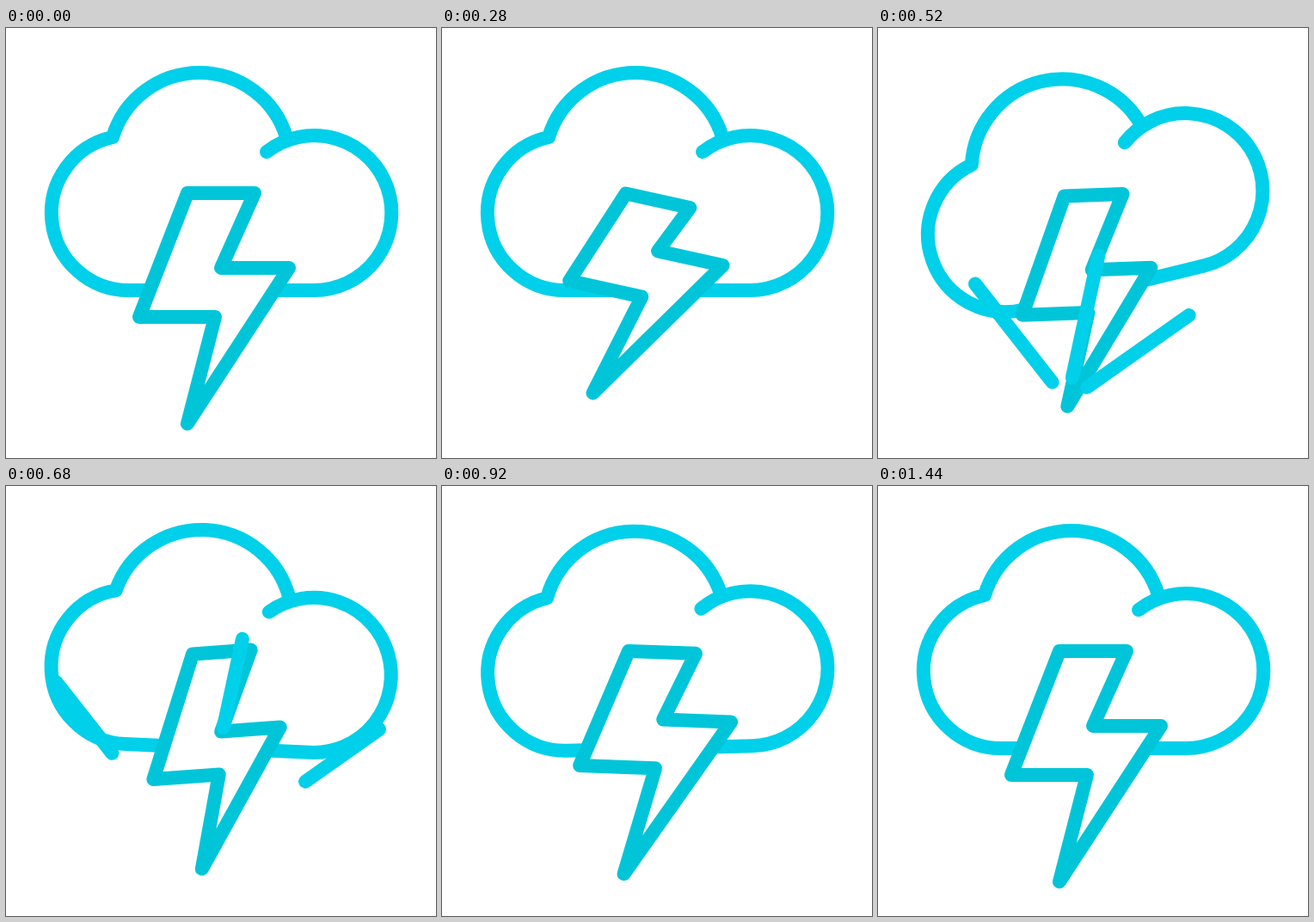
An HTML page with a canvas for the animation above (2000 ms loop, 500 by 500 pixels).

```html
<!DOCTYPE html>
<html lang="en">
<head>
<meta charset="utf-8">
<title>Thunderstorm</title>
<style>
  html, body { margin: 0; width: 100%; height: 100%; overflow: hidden; background: #fff; }
  canvas { display: block; width: 100vmin; height: 100vmin; }
</style>
</head>
<body>
<canvas id="stage" width="500" height="500"></canvas>
<script>
const ctx = document.getElementById('stage').getContext('2d');
const LOOP = 2000, STEP = 40;
const CLOUD = '#00d0e9', BOLT = '#00c5d9';

const cloudPath = new Path2D(
  'M326 127A105.5 105.5 0 0 0 124 127A90 90 0 0 0 143 305H358A90 90 0 1 0 303 144');

// Bolt corners relative to its top left one.
const boltTop = [[0, 0], [78, 0]];
const boltBody = [[39, 87], [118, 87], [0, 268], [32, 144], [-56, 144]];

const RAY_ANGLES = [-128.1, -77.9, -35.2];
const RAY_LENGTH = 262;

const radians = degrees => degrees * Math.PI / 180;
const clamp01 = v => Math.min(1, Math.max(0, v));
const smooth = u => u * u * (3 - 2 * u);
const ramp = (t, from, to) => smooth(clamp01((t - from) / (to - from)));

// Eases from zero through [time, value] turning points.
function swing(t, start, turns) {
  let value = 0, from = start;
  for (const [to, goal] of turns) {
    value += (goal - value) * ramp(t, from, to);
    if (t < to) break;
    from = to;
  }
  return value;
}

function drawCloud(t) {
  const tilt = swing(t, 280, [[480, -15.1], [720, 4], [960, -1.9], [1200, 1.2], [1440, 0]]);
  ctx.save();
  ctx.translate(250, 206);
  ctx.rotate(radians(tilt));
  ctx.translate(-250, -206);
  ctx.strokeStyle = CLOUD;
  ctx.stroke(cloudPath);
  ctx.restore();
}

// The top edge stays nearly in place while the body leans, slides and shrinks.
function drawBolt(t) {
  const lean = swing(t, 0, [[280, 12.4], [590, -4.2], [680, -4.2], [920, 2.1], [1120, 0]]);
  const slide = swing(t, 0, [[280, -28.5], [590, 19], [680, 19], [920, -9], [1120, 0]]);
  const shrink = ramp(t, 200, 520) - ramp(t, 680, 920);
  const drift = ramp(t, 0, 600) - ramp(t, 920, 1120);
  const body = boltBody.map(([x, y]) => [x - 0.45 * slide, y + slide]);

  ctx.save();
  ctx.translate(211 + 6 * drift, 192 + 3.5 * shrink);
  ctx.rotate(radians(lean));
  const scale = 1 - 0.13 * shrink;
  ctx.beginPath();
  for (const [x, y] of [...boltTop, ...body]) ctx.lineTo(x * scale, y * scale);
  ctx.closePath();
  ctx.fillStyle = '#fff';
  ctx.fill();
  ctx.strokeStyle = BOLT;
  ctx.stroke();
  ctx.restore();
}

function drawRays(t) {
  const head = RAY_LENGTH * ramp(t, 270, 680);
  const tail = RAY_LENGTH * ramp(t, 430, 872);
  if (head - tail < 1) return;
  ctx.strokeStyle = CLOUD;
  for (const angle of RAY_ANGLES) {
    ctx.save();
    ctx.translate(220, 434);
    ctx.rotate(radians(angle));
    ctx.beginPath();
    ctx.moveTo(tail, 0);
    ctx.lineTo(head, 0);
    ctx.stroke();
    ctx.restore();
  }
}

function draw(t) {
  ctx.fillStyle = '#fff';
  ctx.fillRect(0, 0, 500, 500);
  ctx.lineWidth = 16;
  ctx.lineCap = ctx.lineJoin = 'round';
  drawCloud(t);
  drawBolt(t);
  drawRays(t);
}

const start = performance.now();
function tick() {
  const t = (performance.now() - start) % LOOP;
  draw(Math.floor(t / STEP) * STEP);
  requestAnimationFrame(tick);
}
tick();
</script>
</body>
</html>
```
